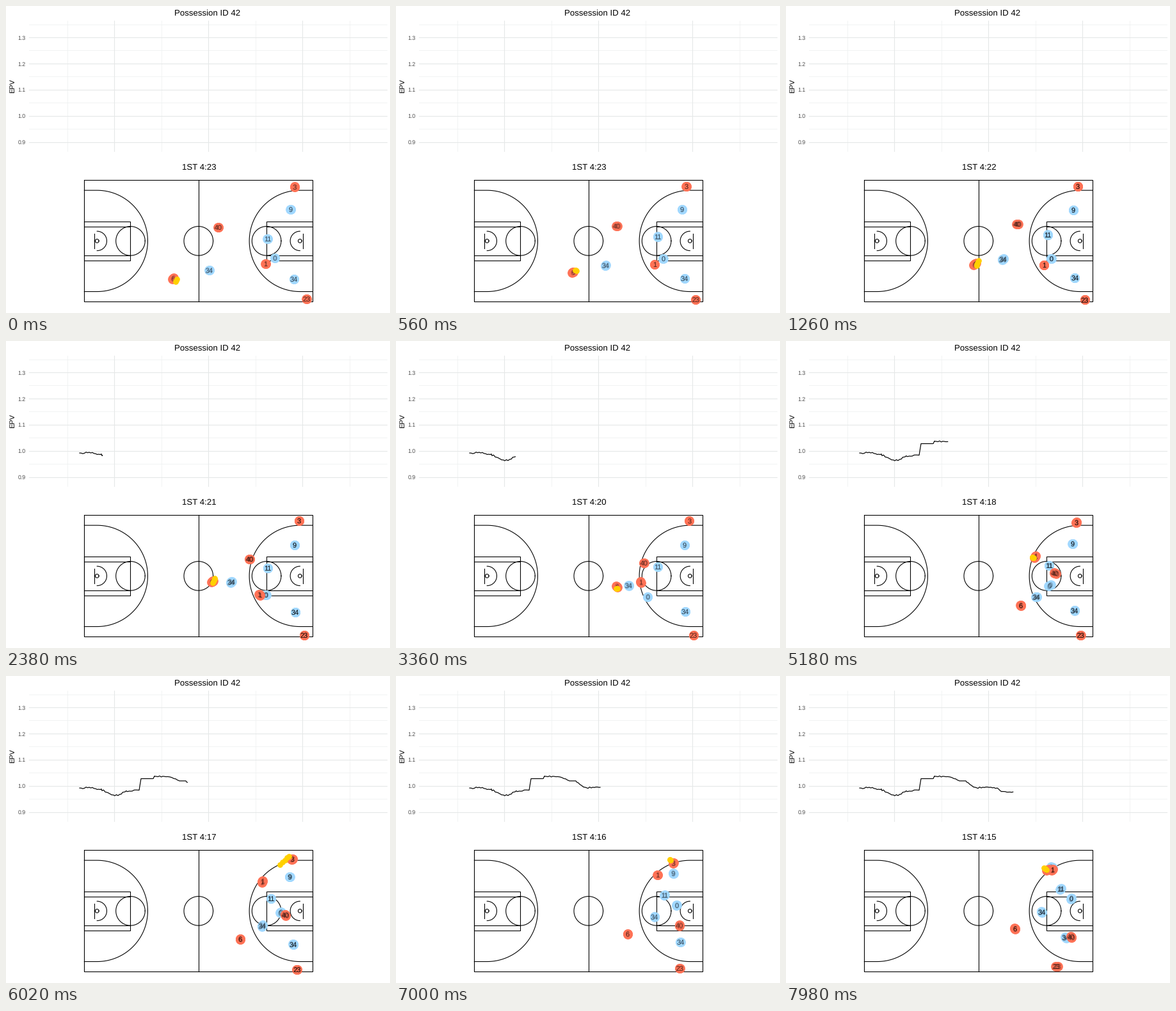
Animation, 600 px wide and 480 px high, one loop 8 s. Source, as a matplotlib script:

```python
import numpy as np
import matplotlib.pyplot as plt
from matplotlib.animation import FuncAnimation

W, H, DPI = 600, 480, 100
PX = 72 / DPI                      # points per pixel
TICK, FRAMES, STEP, LAST = 40, 200, 140, 57

plt.rcParams["font.family"] = "Liberation Sans"
plt.rcParams["text.hinting"] = "none"
fig = plt.figure(figsize=(W / DPI, H / DPI), dpi=DPI, facecolor="white")
ax = fig.add_axes([0, 0, 1, 1])
ax.set(xlim=(0, W), ylim=(H, 0))
ax.axis("off")


def label(x, y, s, size, **kw):
    kw = {"ha": "center", "va": "baseline", "color": "black", **kw}
    return ax.text(x, y, s, fontsize=size * PX, **kw)


def line(xs, ys, color="black", width=1.1, **kw):
    return ax.plot(xs, ys, color=color, lw=width * PX, **kw)[0]


# --- player movement, in steps of time -----------------------------------
def settle(start, spot, end):
    """Ease from start onto a spot, then leave it late for the end."""
    a, m, b = (np.array(p, float) for p in (start, spot, end))

    def at(t):
        u = np.asarray(t, float)[..., None] / LAST
        return m + (a - m) * (1 - u) ** 5 + (b - m) * u ** 5
    return at


def run(*points):
    """Smooth cubic path through evenly timed points."""
    p = np.array(points, float)
    slope = np.gradient(p, axis=0)

    def at(t):
        s = np.asarray(t, float) / LAST * (len(p) - 1)
        k = np.clip(s.astype(int), 0, len(p) - 2)
        u = (s - k)[..., None]
        v = 1 - u
        return (v * v * ((1 + 2 * u) * p[k] + u * slope[k])
                + u * u * ((1 + 2 * v) * p[k + 1] - v * slope[k + 1]))
    return at


BLUE, RED, GOLD = "#a1d8ff", "#ff7256", "#ffd000"

three = settle((451, 282.5), (459.5, 281), (409, 303))
one = run((405.5, 403), (400, 402), (378, 363), (400, 322), (416, 303))
six = run((261, 426), (297, 402), (329, 373), (357, 399),
          (367, 414), (363, 406), (357.5, 395))

team = [
    (BLUE, "9", settle((444.5, 318), (452, 319), (415.5, 299))),
    (BLUE, "11", settle((408.5, 364), (409, 353), (429, 333))),
    (BLUE, "0", run((420, 394), (410, 396), (391, 398), (428.5, 370), (445.5, 348))),
    (BLUE, "34", run((317.5, 413), (340, 395), (355, 375), (372, 392),
                     (393, 400), (404, 380), (399.5, 369))),
    (BLUE, "34", settle((450, 427), (452.5, 423), (437, 409))),
    (RED, "3", three),
    (RED, "40", run((331.5, 346), (376, 340), (394, 352), (436, 373), (445.5, 408))),
    (RED, "1", one),
    (RED, "23", settle((469.5, 458), (465, 460.5), (423, 454))),
    (RED, "6", six),
]

# passer, receiver, release, catch
PASSES = [(six, one, 29, 33.4), (one, three, 40.2, 43.4)]


def dribble(who, t):
    t = np.asarray(t, float)
    sway = 5 * np.cos(np.pi * t / 48)
    bounce = 6 * np.sin(np.radians(150 + 45 * t))
    return who(t) + np.stack([sway, bounce], axis=-1)


def ball_at(t):
    pos = dribble(PASSES[0][0], t)
    for giver, taker, t0, t1 in PASSES:
        a, b = dribble(giver, t0), dribble(taker, t1)
        u = ((t - t0) / (t1 - t0))[:, None]
        pos = np.where(u < 0, pos, np.where(u < 1, a + (b - a) * u, dribble(taker, t)))
    return pos


# --- chart ---------------------------------------------------------------
X0, SPEED, T0 = 115, 5.1, 10       # curve start, px per step, first step


def epv_y(v):
    return 171.7 - (v - 1) * 409


def grid(xs, ys, major):
    line(xs, ys, *(("#e5e8e8", 1.1) if major else ("#eef1f1", 0.8)))


for major in (False, True):
    for k in range(major, 10, 2):
        v = 0.85 + 0.05 * k
        if k:
            grid([36, 595], [epv_y(v)] * 2, major)
    if not major:
        grid([36, 595], [epv_y(1.35)] * 2, major)
    for k in range(major, 7, 2):
        x = 95.6 + 73.5 * k
        grid([x, x], [23, 227], major)
for v in np.arange(0.9, 1.31, 0.1):
    label(31, epv_y(v) + 3.6, f"{v:.1f}", 8.8, ha="right", color="#4d4d4d")

label(315, 15.3, "Possession ID 42", 13.2)
label(9.8, 124.5, "EPV", 11, rotation=90, va="center")
clock = label(301.5, 255.4, "", 13.2)


def epv_curve():
    """Trend through its turning points, jittery except while a pass flies."""
    kx, ky = np.array([
        (X0, 175.5), (130, 174.5), (149, 177.5), (164, 185.5), (175, 187),
        (187, 180.5), (208, 178), (211, 160.5), (230, 160.5), (232, 157),
        (255, 157), (271, 164), (281, 164), (292, 174), (330, 175),
        (337, 180.5), (355, 181.5)]).T
    x = np.union1d(kx, np.arange(X0, 355, 2.5))
    y = np.interp(x, kx, ky)
    t = T0 + (x - X0) / SPEED
    held = np.all([(t < t0 - 0.4) | (t > t1 - 0.7) for *_, t0, t1 in PASSES], axis=0)
    return x, y + held * np.random.default_rng(4).normal(0, 0.6, x.size)


epv_x, epv_line = epv_curve()
curve = line([], [], width=1.2)

# --- court, drawn in feet from its centre --------------------------------
CX, CY, FT = 300.8, 367.35, 3.797


def court(xs, ys):
    line(CX + FT * np.array(xs), CY + FT * np.array(ys), solid_joinstyle="miter")


def arc(x, r, a0=0, a1=360):
    a = np.radians(np.linspace(a0, a1, 90))
    return x + r * np.cos(a), r * np.sin(a)


court([-47, 47, 47, -47, -47], [-25, -25, 25, 25, -25])
court([0, 0], [-25, 25])
court(*arc(0, 6))
for side in (-1, 1):
    base, foul, hoop, board = (side * d for d in (47, 28, 41.75, 43))
    facing = (90, 270) if side > 0 else (90, -90)
    xs, ys = arc(hoop, 20.85, *facing)
    court([base, *xs, base], [ys[0], *ys, ys[-1]])
    court(*arc(hoop, 4, *facing))
    court([base, foul, foul, base, base], [-8, -8, 8, 8, -8])
    for y in (-6, 6):
        court([base, foul], [y, y])
    court(*arc(foul, 6))
    court(*arc(hoop, 0.75))
    court([board, board], [-3, 3])

# --- markers -------------------------------------------------------------
MAX_ROWS = 5


def dots(color, size, z):
    return line([], [], color, ls="none", marker="o", ms=size * PX, mew=0, zorder=z)


players = []
for z, (color, number, track) in enumerate(team, 5):
    tags = [label(0, 0, number, 11, alpha=0.3, zorder=z + 0.5) for _ in range(MAX_ROWS)]
    players.append((track, dots(color, 14.8, z), tags))
ball = dots(GOLD, 8.8, 30)


def update(i):
    s = min((i * TICK + TICK - 1) // STEP, LAST)

    left = int(263.7 - 0.15 * s)
    clock.set_text(f"1ST {left // 60}:{left % 60:02d}")

    end = X0 + SPEED * (s - T0)
    seen = epv_x < end
    tip = [(end, np.interp(end, epv_x, epv_line))] if seen.any() else []
    trail = list(zip(epv_x[seen], epv_line[seen])) + tip
    curve.set_data([p[0] for p in trail], [p[1] for p in trail])

    # each picture overlays a few tracking rows, a quarter step apart
    rows = 5 if s % 2 else 3
    t = s + (np.arange(rows) - (rows - 1) / 2) / 4
    for track, marks, tags in players:
        pos = track(t)
        marks.set_data(*pos.T)
        for k, tag in enumerate(tags):
            tag.set_visible(k < rows)
            if k < rows:
                tag.set_position((pos[k, 0], pos[k, 1] + 4))
    ball.set_data(*ball_at(t).T)
    return []


anim = FuncAnimation(fig, update, frames=FRAMES, interval=TICK, repeat=True,
                     repeat_delay=0, init_func=lambda: update(0))
plt.show()
```
